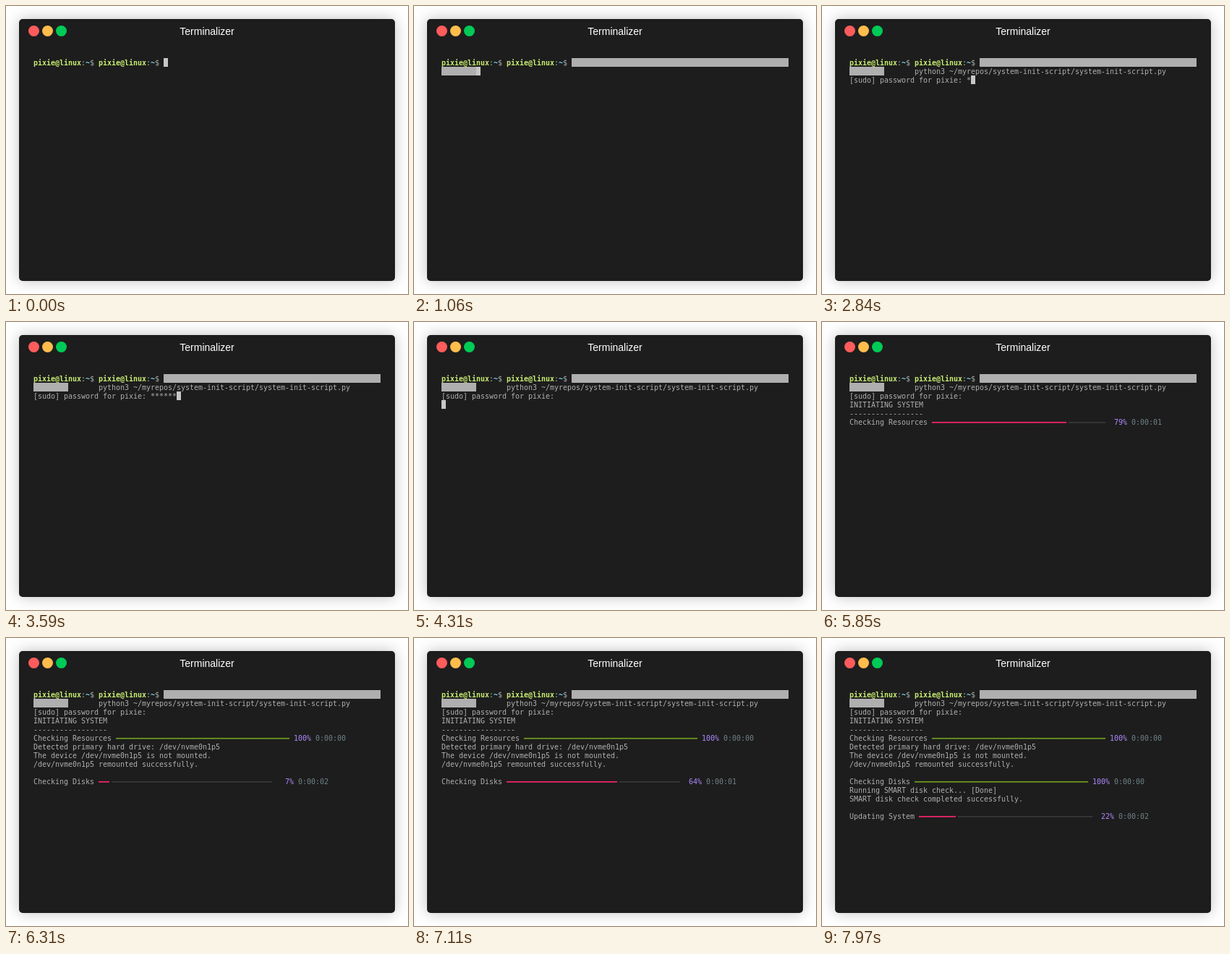
These frames come from a looping animation (556 by 398 pixels, 8000 ms). An HTML page:

```html
<!DOCTYPE html>
<html lang="en">
<head>
<meta charset="utf-8">
<title>Terminal</title>
<style>
html, body { margin: 0; width: 100%; height: 100%; overflow: hidden; background: #fff; }
svg { position: absolute; left: 0; top: 0; }
.window {
  position: absolute; left: 18px; top: 18px; width: 520px; height: 362px;
  border-radius: 5px; background: #1d1d1d; box-shadow: 0 0 20px rgba(0, 0, 0, .25);
}
.title { font: 14px "Liberation Sans", Arial, sans-serif; }
#screen { font: 10px "DejaVu Sans Mono", monospace; white-space: pre; }
</style>
</head>
<body>
<div class="window"></div>
<svg width="556" height="398" viewBox="0 0 556 398">
  <circle cx="38.5" cy="34.5" r="7.5" fill="#ff5c5c"/>
  <circle cx="57.5" cy="34.5" r="7.5" fill="#ffbd4c"/>
  <circle cx="76.5" cy="34.5" r="7.5" fill="#00ca56"/>
  <text class="title" x="278" y="40" text-anchor="middle" fill="#fff">Terminalizer</text>
  <g id="screen"></g>
</svg>
<script>
const LOOP = 8000, CELL = 6, LINE = 12, LEFT = 38, TOP = 72;
const USER = 'pixie';
const COMMAND = 'python3 ~/myrepos/system-init-script/system-init-script.py';
const COLOR = {
  text: '#afafaf', cursor: '#c7c7c7', user: '#c8ed71', path: '#75dff2',
  percent: '#ae89fe', time: '#708387', done: '#729c1f', active: '#f92672', rest: '#3a3a3a'
};
const KEYS = [2840, 3000, 3160, 3290, 3430, 3510, 3600, 3680, 3770, 3850];
const screen = document.getElementById('screen');

function put(row, col, str, color = COLOR.text, bold = false) {
  const xs = Array.from(str, (_, i) => LEFT + (col + i) * CELL).join(' ');
  return `<text x="${xs}" y="${TOP + row * LINE + 10}" fill="${color}"` +
    `${bold ? ' font-weight="700"' : ''}>${str}</text>`;
}

function block(row, col, len, color) {
  return `<rect x="${LEFT + col * CELL}" y="${TOP + row * LINE}" ` +
    `width="${len * CELL}" height="${LINE}" fill="${color}"/>`;
}

const cursor = (row, col) => block(row, col, 1, COLOR.cursor);

function prompt(col) {
  return put(0, col, USER + '@linux', COLOR.user, true) + put(0, col + 11, ':') +
    put(0, col + 12, '~', COLOR.path, true) + put(0, col + 13, '$');
}

// Progress bar of 40 cells, drawn in half-cell steps and refreshed every 100 ms
function progress(row, label, start, rate, t) {
  const tick = Math.floor((t - start) / 100);
  const value = Math.min(100, tick * rate);
  const finished = value >= 100;
  const halves = Math.floor(value * 0.8);
  const full = halves >> 1, odd = halves % 2;
  const col = label.length + 1;
  const pct = Math.round(value) + '%';
  const left = value ? '0:00:0' + Math.ceil((100 - value) / 70) : '-:--:--';
  const fill = '━'.repeat(full) + (odd ? '╸' : '');
  const gap = !odd && full > 0 && full < 40 ? '╺' : '';
  const rest = gap + '━'.repeat(40 - full - odd - gap.length);
  return put(row, 0, label) +
    (fill && put(row, col, fill, finished ? COLOR.done : COLOR.active)) +
    (rest && put(row, col + full + odd, rest, COLOR.rest)) +
    put(row, col + 45 - pct.length, pct, COLOR.percent) +
    put(row, col + 46, left, COLOR.time);
}

function frame(t) {
  let out = prompt(0) + prompt(15);
  if (t < 1060) return out + cursor(0, 30);

  out += block(0, 30, 50, COLOR.text) + block(1, 0, 8, COLOR.text);
  if (t < 1810) return out + cursor(1, 8);

  out += put(1, 15, COMMAND);
  if (t < 1970) return out + cursor(2, 0);

  const ask = `[sudo] password for ${USER}:`;
  out += put(2, 0, ask);
  if (t < 4310) {
    const stars = KEYS.filter(k => k <= t).length;
    return out + put(2, ask.length + 1, '*'.repeat(stars)) + cursor(2, ask.length + 1 + stars);
  }
  if (t < 4450) return out + cursor(3, 0);

  out += put(3, 0, 'INITIATING SYSTEM') + put(4, 0, '-'.repeat(17));
  if (t < 4750) return out + cursor(5, 0);

  out += progress(5, 'Checking Resources', 4750, 7.15, t);
  if (t >= 6190) {
    out += put(6, 0, 'Detected primary hard drive: /dev/nvme0n1p5') +
      put(7, 0, 'The device /dev/nvme0n1p5 is not mounted.') +
      put(8, 0, '/dev/nvme0n1p5 remounted successfully.');
  }
  if (t >= 6210) out += progress(10, 'Checking Disks', 6210, 7.15, t);
  if (t >= 7650) {
    out += put(11, 0, 'Running SMART disk check... [Done]') +
      put(12, 0, 'SMART disk check completed successfully.');
  }
  if (t >= 7670) out += progress(14, 'Updating System', 7670, 7.2, t);
  return out;
}

let shown = '', origin = null;
function draw(now) {
  if (origin === null) origin = now;
  const next = frame((now - origin) % LOOP);
  if (next !== shown) screen.innerHTML = shown = next;
  requestAnimationFrame(draw);
}
screen.innerHTML = shown = frame(0);
requestAnimationFrame(draw);
</script>
</body>
</html>
```
